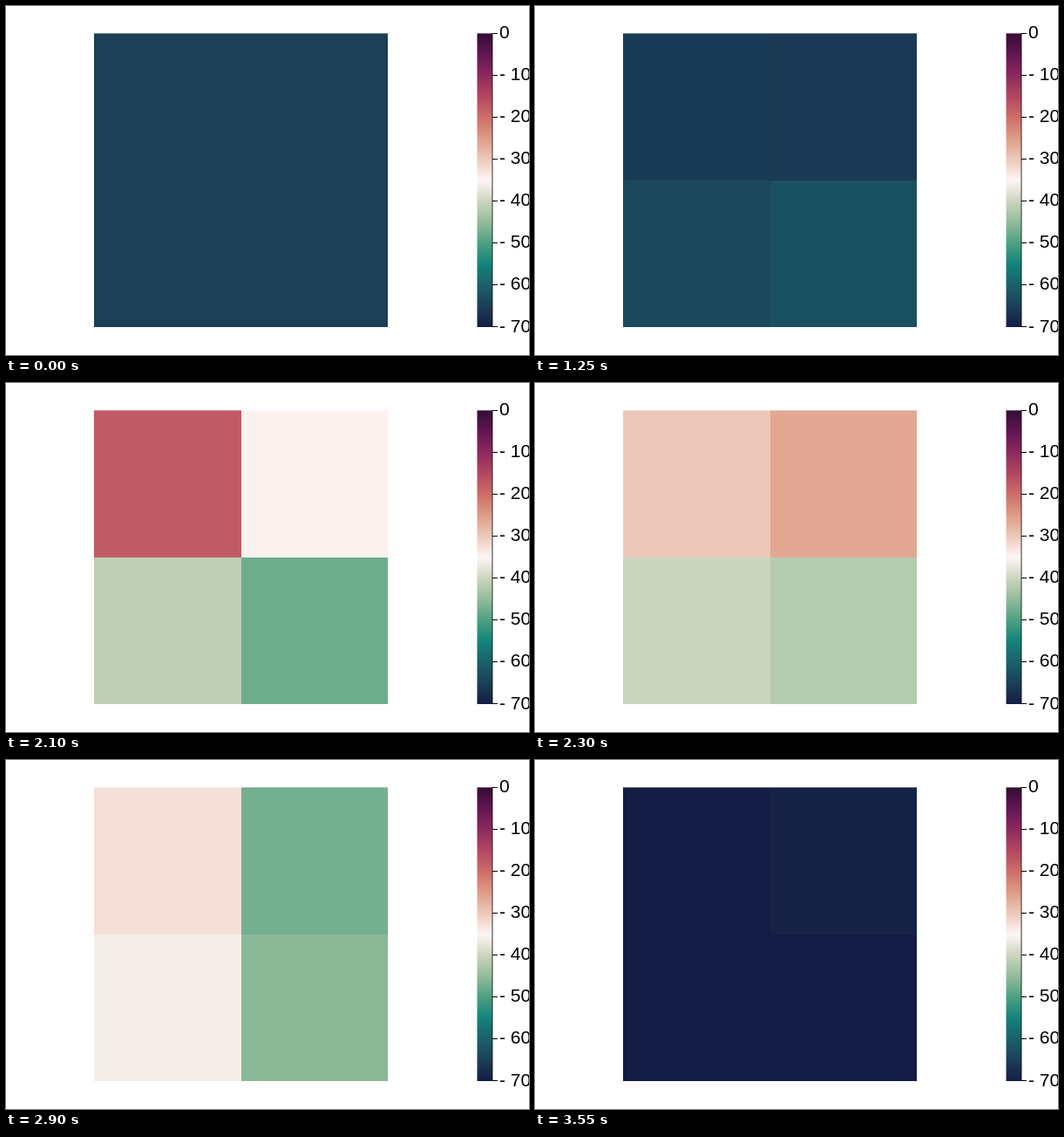
An HTML page that plays this animation: 600x400 px, repeating every 8000 ms.

```html
<!DOCTYPE html>
<html lang="en">
<head>
<meta charset="utf-8">
<title>Voltage heatmap</title>
<style>
  html, body { margin: 0; width: 100%; height: 100%; overflow: hidden; background: #fff; }
  svg { display: block; }
  text { font: 21px "Liberation Sans", Arial, sans-serif; white-space: pre; }
</style>
</head>
<body>
<svg id="stage" width="600" height="400" viewBox="0 0 600 400">
  <defs><linearGradient id="scale" x1="0" y1="1" x2="0" y2="0"></linearGradient></defs>
</svg>
<script>
const LOOP = 8000, STEP = 50;
const TOP = 31.4, MIDDLE = 200, BOTTOM = 368;
const V_MIN = -70, V_START = -64.8, LEVELS = 256;

// Diverging colours, one every 5 mV from -70 to 0
const COLOURS = `151d44 1b3f57 1a616b 14827a 4ca182 93bb9a ccd5be fef6f4
  ecc9ba de9c86 ce6d68 b24761 8d295e 621553 340d35`.split(/\s+/);

// Slow drift (mV/s), then a wave through key voltages, then a fall to rest
const WAVE_START = 1650, FALL_START = 3150, FALL_END = 3550;
const WAVE_TIMES = [WAVE_START, 2100, 2550, 2900, FALL_START];
const CELLS = [
  { x: 101, y: TOP, drift: -0.56, wave: [-17.6, -47.7, -32.3, -45.6], rest: -70 },
  { x: 270, y: TOP, drift: -0.8, wave: [-34.7, -14.8, -47.3, -47.8], rest: -69.3 },
  { x: 101, y: MIDDLE, drift: 0.88, wave: [-41.2, -38.4, -36.2, -47.8], rest: -70 },
  { x: 270, y: MIDDLE, drift: 1.92, wave: [-47.7, -33.9, -45.6, -60.8], rest: -70 }
];

const stage = document.getElementById("stage");
const mix = (a, b, f) => a + (b - a) * f;
const smooth = f => (1 - Math.cos(Math.PI * f)) / 2;

function add(parent, tag, attrs, text = "") {
  const el = document.createElementNS("http://www.w3.org/2000/svg", tag);
  for (const name in attrs) el.setAttribute(name, attrs[name]);
  el.textContent = text;
  return parent.appendChild(el);
}

function voltage({ drift, wave, rest }, t) {
  const drifted = V_START + drift * Math.min(t, WAVE_START) / 1000;
  if (t <= WAVE_START) return drifted;
  if (t >= FALL_START) {
    const left = Math.max(0, (FALL_END - t) / (FALL_END - FALL_START));
    return mix(rest, wave.at(-1), left ** 3);
  }
  const i = WAVE_TIMES.findLastIndex(at => at <= t);
  const f = (t - WAVE_TIMES[i]) / (WAVE_TIMES[i + 1] - WAVE_TIMES[i]);
  return mix(i ? wave[i - 1] : drifted, wave[i], smooth(f));
}

// The scale has a fixed number of levels, so slow drift shows as small jumps
function colour(volts) {
  const level = Math.round((1 - volts / V_MIN) * (LEVELS - 1)) / (LEVELS - 1);
  const pos = level * (COLOURS.length - 1);
  const i = Math.min(Math.floor(pos), COLOURS.length - 2);
  const channel = (hex, k) => parseInt(hex.slice(2 * k, 2 * k + 2), 16);
  const rgb = [0, 1, 2].map(k =>
    Math.round(mix(channel(COLOURS[i], k), channel(COLOURS[i + 1], k), pos - i)));
  return `rgb(${rgb})`;
}

for (const cell of CELLS) {
  const { x, y } = cell;
  cell.rect = add(stage, "rect", {
    x, y,
    width: (x < 270 ? 270 : 438) - x,
    height: (y < MIDDLE ? MIDDLE : BOTTOM) - y
  });
}

// Colour bar with its axis
COLOURS.forEach((hex, i) => add(document.getElementById("scale"), "stop",
  { offset: i / (COLOURS.length - 1), "stop-color": "#" + hex }));
add(stage, "rect", { x: 540.5, y: TOP, width: 17.5, height: BOTTOM - TOP, fill: "url(#scale)" });
add(stage, "path", { d: `M558 31V${BOTTOM}`, stroke: "#000", "stroke-width": 0.8 });
for (let i = 0; i <= 7; i++) {
  const y = 31 + i * 48.1;
  add(stage, "path", { d: `M558 ${Math.floor(y) + 0.5}h6`, stroke: "#000" });
  add(stage, "text", { x: 566, y: y + 5.8 }, i ? `- ${i * 10}` : "0");
}

function draw() {
  const t = performance.now() % LOOP;
  const tick = Math.floor(t / STEP) * STEP;
  for (const cell of CELLS) cell.rect.setAttribute("fill", colour(voltage(cell, tick)));
  requestAnimationFrame(draw);
}
draw();
</script>
</body>
</html>
```
